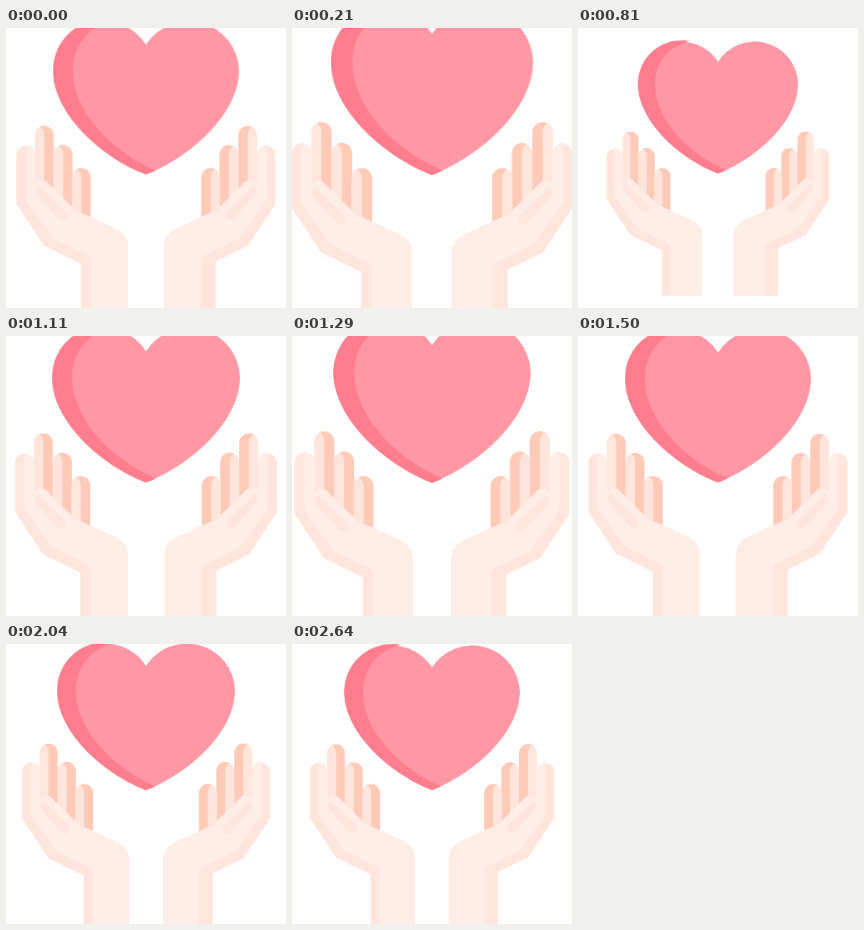
Write an HTML page that moves like this. It is 280x280 px and loops after 2730 ms.

```html
<!DOCTYPE html>
<html lang="en">
<head>
<meta charset="utf-8">
<title>Heart in hands</title>
<style>
  html, body { margin: 0; width: 100%; height: 100%; overflow: hidden; background: #fff; }
  svg { display: block; width: 100vw; height: 100vh; overflow: hidden; }
  .beat {
    transform-origin: 256px 256px;
    animation: beat 2730ms cubic-bezier(.333, 1, .667, 1) infinite;
  }
  @keyframes beat {
    0%   { transform: scale(1.0556); }
    5%   { transform: scale(1.2222); }
    39%  { transform: scale(.9056); }
    45%  { transform: scale(1.1667); }
    60%  { transform: scale(1.0556); }
    100% { transform: scale(1); }
  }
  .skin { fill: #ffede6; }
  .shade { fill: #ffe5db; }
  .deep { fill: #ffcbb8; }
  .crease, .thumb { fill: none; stroke-linecap: round; }
  .crease { stroke: #ffe5db; stroke-width: 17; }
  .thumb { stroke: #ffede6; stroke-width: 15; }
</style>
</head>
<body>
<svg viewBox="0 0 512 512">
  <defs>
    <!-- one finger: light outer half, deep inner half -->
    <g id="finger">
      <path class="deep" d="M-8 2Q-4 0 0 0A16.3 16.3 0 0 1 16.3 16V125H-1V16Z"/>
      <path class="shade" d="M-8 2A16.3 16.3 0 0 0 -16.3 16V125H0V16Q0 6 -8 2Z"/>
    </g>
    <g id="hand">
      <use href="#finger" x="80.5" y="183"/>
      <use href="#finger" x="113" y="216"/>
      <use href="#finger" x="144.5" y="256"/>
      <path class="shade" d="M32.5 232A15.8 16 0 0 1 64 232V287L126 325L161 341L205 362Q225 372 225 392V512H143.5V421L80 390L32.5 318Z"/>
      <path class="skin" d="M48 216A16 16 0 0 1 64 232V284Q74 270 86 281L126 325Q132 330 161 341L205 361Q225 371 225 392V512H160.5V417Q160 409 153 406L95 378L48 312Z"/>
      <path class="crease" d="M74 296L111 337"/>
      <path class="thumb" d="M80 286L124 329"/>
    </g>
  </defs>
  <g class="beat">
    <use href="#hand"/>
    <use href="#hand" transform="translate(512) scale(-1 1)"/>
    <!-- the right wrist is slightly wider -->
    <path class="shade" d="M366 512V420L376 417V512Z"/>
    <path fill="#ff97a5" d="M256 43A87 87 0 0 0 95.5 87C95.5 167 188 242 256 267C324 242 416.5 167 416.5 87A87 87 0 0 0 256 43Z"/>
    <path fill="#ff7d8c" d="M199 1.5A87 87 0 0 0 95.5 87C95.5 167 188 242 256 267Q265 264 273 260C207 233 129.5 165 129.5 87C129.5 45 158 10 199 1.5Z"/>
  </g>
</svg>
</body>
</html>
```
